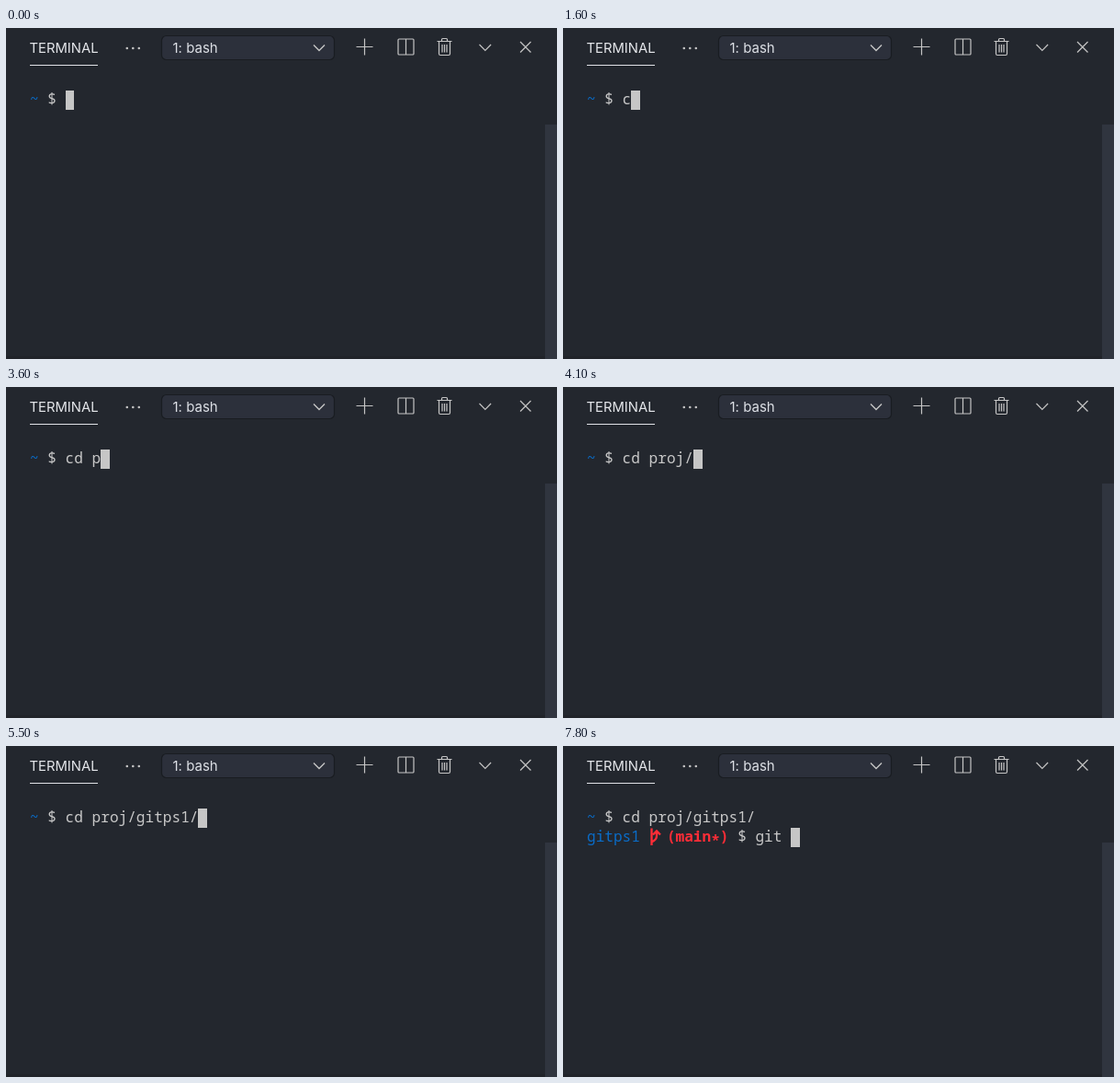
Recreate the animation shown at these times as an HTML page. Size 600x360 px, loop 8000 ms.

```html
<!DOCTYPE html>
<html lang="en">
<head>
<meta charset="utf-8">
<title>Terminal</title>
<style>
  /* a, b: visible columns of the first and second line; row: cursor line */
  @property --a { syntax: '<integer>'; inherits: true; initial-value: 4; }
  @property --b { syntax: '<integer>'; inherits: true; initial-value: 0; }
  @property --row { syntax: '<integer>'; inherits: true; initial-value: 0; }

  html, body { margin: 0; width: 100%; height: 100%; overflow: hidden; background: #23272e; }
  .stage { position: relative; width: 600px; height: 360px; overflow: hidden; }
  .stage > * { position: absolute; }
  .bar { left: 0; top: 0; }
  .bar text { font: 15px Inter, "Liberation Sans", sans-serif; fill: #dcdfe5; }
  .bar .title { font-size: 14.8px; fill: #e4e6ea; }
  .scroll { left: 587px; top: 105px; width: 13px; height: 255px; background: #30353f; }
  .edge { left: 0; top: 357px; width: 587px; height: 3px; background: #202329; }

  .term {
    left: 26px; top: 68px;
    font: 16.1px/21px "Noto Sans Mono", "DejaVu Sans Mono", monospace;
    color: #c8c8c8; white-space: pre; font-variant-ligatures: none;
    animation: type 8s step-end infinite;
  }
  .line { position: absolute; left: 0; top: -1.5px; overflow-x: clip; width: calc(var(--a) * 1ch); }
  .second { top: 19.5px; width: calc(var(--b) * 1ch); }
  .path { color: #0a6cc8; }
  .branch { color: #ff2d37; font-weight: 700; }
  .branch i { position: relative; top: 4px; font-style: normal; }
  .line svg { position: absolute; left: 67px; top: 0; }
  .cursor {
    position: absolute; width: 9.66px; height: 21px; background: #c6c6c6;
    left: calc((var(--a) * (1 - var(--row)) + var(--b) * var(--row)) * 1ch);
    top: calc(var(--row) * 21px);
  }
  @keyframes type {
    0% { --a: 4; --b: 0; --row: 0; }
    20% { --a: 5; }
    22.5% { --a: 6; }
    23.75% { --a: 7; }
    45% { --a: 8; }
    47.5% { --a: 9; }
    48.75% { --a: 10; }
    50% { --a: 11; }
    51.25% { --a: 12; }
    63.75% { --a: 13; }
    66.25% { --a: 14; }
    67.5% { --a: 15; }
    68.75% { --a: 19; }
    75% { --row: 1; }
    76.25% { --b: 19; }
    95% { --b: 20; }
    96.25% { --b: 22; }
    97.5% { --b: 23; }
    100% { --a: 19; --b: 23; --row: 1; }
  }

  .mouse { left: -6px; top: -12px; animation: move 8s step-end infinite; }
  @keyframes move {
    0% { opacity: 0; transform: translate(345px, 314px); }
    2.5% { opacity: 1; transform: translate(345px, 314px); }
    3.75% { transform: translate(341px, 287px); }
    5% { transform: translate(335.5px, 256px); }
    6.25% { transform: translate(328px, 222.5px); }
    7.5% { transform: translate(317px, 185px); }
    10% { transform: translate(317.5px, 185.5px); }
    11.25% { transform: translate(317.5px, 186px); }
    20% { opacity: 0; }
    23.75% { opacity: 1; }
    45%, 100% { opacity: 0; transform: translate(317.5px, 186px); }
  }
</style>
</head>
<body>
<div class="stage">
  <svg class="bar" width="600" height="60" fill="none" stroke="#c5c5c5" stroke-width="1.2">
    <g stroke="none">
      <text class="title" x="25.5" y="27">TERMINAL</text>
      <path d="M26 40h74v1H26z" fill="#e0e2e6"/>
      <g fill="#c5c5c5">
        <circle cx="131.8" cy="22" r="1.3"/>
        <circle cx="138.3" cy="22" r="1.3"/>
        <circle cx="144.8" cy="22" r="1.3"/>
      </g>
    </g>
    <rect x="169.5" y="8.5" width="188" height="26" rx="5" fill="#2c303b" stroke="#191c21"/>
    <text x="181.5" y="27.3" stroke="none">1: bash</text>
    <path d="M335 18.5l6 6 6-6" stroke-width="1.4"/>
    <path d="M390.5 11.5v18M381.5 20.5h18"/>
    <path d="M428 12h15q1 0 1 1v15q0 1-1 1h-15q-1 0-1-1V13q0-1 1-1zM435.5 12v17"/>
    <path d="M469.5 14.5h16M474.5 14.5v-2q0-1 1-1h4q1 0 1 1v2M471.5 14.5v13.500q0 1.500 1.500 1.500h9q1.500 0 1.500-1.500V14.500M475 18v8.500M477.500 18v8.500M480 18v8.500"/>
    <path d="M515.5 18l6.300 6.300 6.300-6.300M560 15l11.500 11.500M571.500 15L560 26.500"/>
  </svg>
  <div class="edge"></div>
  <div class="scroll"></div>

  <div class="term">
    <div class="line"><span class="path">~</span> $ cd proj/gitps1/</div>
    <div class="line second"><span class="path">gitps1</span>   <span class="branch">(main<i>*</i>)</span> $ git <svg width="16" height="22" fill="none" stroke="#ff2d37" stroke-width="2.3"><path d="M3.500 1.500v18.500M3.500 16.500Q9 14 9 10V6M5 8.500l4-4 4 4"/></svg></div>
    <div class="cursor"></div>
  </div>

  <svg class="mouse" width="12" height="24" viewBox="-6 -12 12 24" fill="none" stroke-linecap="round">
    <defs>
      <path id="beam" d="M-3.500-9Q-.5-9 0-7 .5-9 3.500-9M0-7V7M-3.500 9Q-.5 9 0 7 .5 9 3.500 9M-1.500 2.500h3"/>
    </defs>
    <use href="#beam" stroke="#15171b" stroke-width="2.800"/>
    <use href="#beam" stroke="#fff" stroke-width="1.300"/>
  </svg>
</div>
</body>
</html>
```
